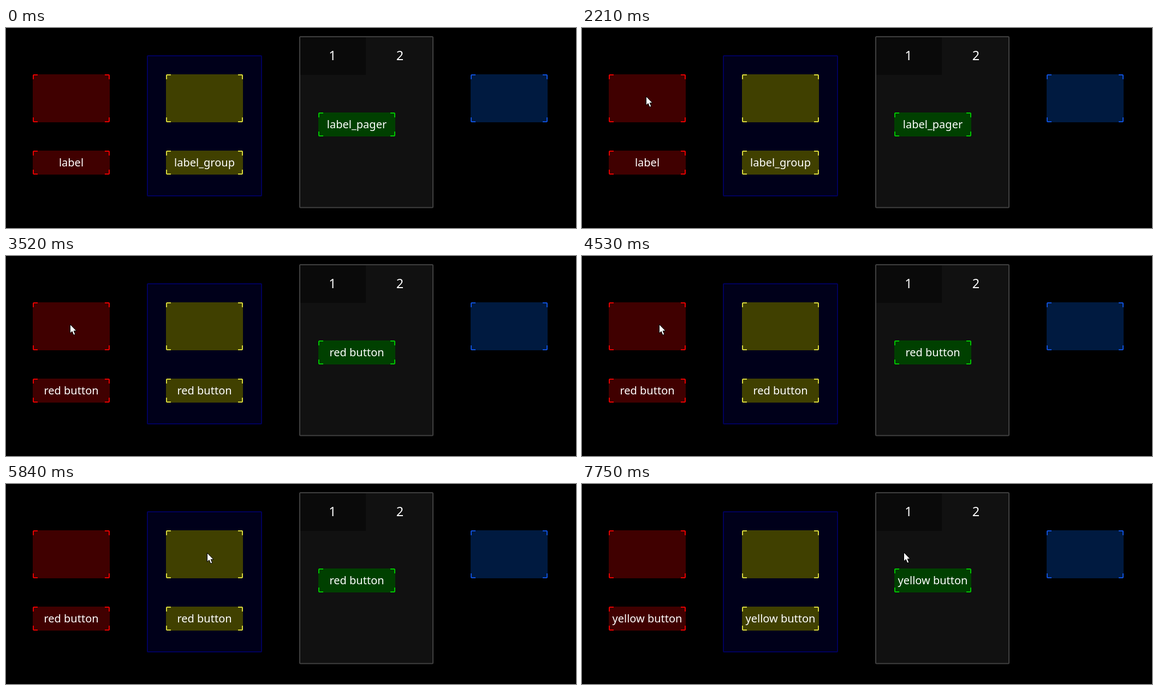
Recreate the animation shown at these times as an HTML page. Size 1044 by 367 pixels, loop 8000 ms.

```html
<!DOCTYPE html>
<html lang="en">
<head>
<meta charset="utf-8">
<title>Button labels</title>
<style>
  html, body { margin: 0; width: 100%; height: 100%; overflow: hidden; background: #000; }
  svg { display: block; }
  text { font: 20px "Noto Sans", "Open Sans", sans-serif; fill: #fff; text-anchor: middle; }
  .tab { font-size: 23.5px; }
</style>
</head>
<body>
<svg id="stage" width="1044" height="367" viewBox="0 0 1044 367">
  <rect x="259" y="51" width="209" height="257" rx="1" fill="#00001a" stroke="#00005c" stroke-width="2"/>
  <rect x="538" y="16" width="244" height="313.5" rx="1.5" fill="#111" stroke="#404040" stroke-width="2"/>
  <rect x="539" y="17" width="120" height="69" fill="#0a0a0a"/>
  <text class="tab" x="598" y="59">1</text>
  <text class="tab" x="721.5" y="59">2</text>
  <g id="boxes"></g>
  <rect id="redLit" x="54" y="90" width="131" height="78.5" rx="2" fill="#f00"/>
  <rect id="yellowLit" x="298" y="90" width="131" height="78.5" rx="2" fill="#ff0"/>
  <g id="cursor">
    <path d="M.5.5V16.8L4.2 13.4L6.8 20L9.8 18.8L7.2 12.4H12Z" fill="#fff" stroke="#000"/>
    <circle id="press" r="12" fill="#ff0" fill-opacity=".5"/>
  </g>
</svg>
<script>
const LOOP = 8000;
const $ = id => document.getElementById(id);
const boxes = $("boxes");

function add(tag, attrs) {
  const node = document.createElementNS("http://www.w3.org/2000/svg", tag);
  for (const name in attrs) node.setAttribute(name, attrs[name]);
  return boxes.appendChild(node);
}

// Filled box with bracket marks in its four corners.
function addBox(x, y, h, fill, mark) {
  const w = 141;
  add("rect", { x, y, width: w, height: h, rx: 2, fill });
  const corner = (cx, cy, sx, sy) =>
    `M${cx + 9 * sx} ${cy + sy}H${cx + 2 * sx}L${cx + sx} ${cy + 2 * sy}V${cy + 9 * sy}`;
  const d = corner(x, y, 1, 1) + corner(x + w, y, -1, 1) +
            corner(x, y + h, 1, -1) + corner(x + w, y + h, -1, -1);
  add("path", { d, fill: "none", stroke: mark, "stroke-width": 2 });
}

function addLabel(x, y, fill, mark) {
  addBox(x, y, 44, fill, mark);
  return add("text", { x: x + 70.5, y: y + 29 });
}

const red = ["#400000", "#e60000"], yellow = ["#404000", "#d6d63c"];
addBox(49, 85, 88, ...red);
addBox(293, 85, 88, ...yellow);
addBox(851, 85, 88, "#001a40", "#0f50d8");
const labels = [
  [addLabel(49, 225, ...red), "label"],
  [addLabel(293, 225, ...yellow), "label_group"],
  [addLabel(572, 155, "#004000", "#00c400"), "label_pager"]
];

// Pointer moves: first step, last step, step count, end x, end y, ease-out power.
const moves = [
  [780, 1100, 4, 374, 291, 1],
  [1300, 1400, 2, 246, 225, 1],
  [1500, 2010, 6, 116, 124, 2],
  [2210, 2310, 2, 117, 125, 1],
  [4530, 5240, 8, 286, 125, 1.13],
  [5340, 5840, 6, 368, 126, 1.5],
  [6150, 6150, 1, 366, 125, 1],
  [7450, 7750, 4, 589, 125, 1]
];

function pointerAt(t) {
  let x = 926, y = 370;
  for (const [start, end, count, toX, toY, power] of moves) {
    if (t < start) break;
    const step = Math.floor((t - start) / (end - start || 1) * (count - 1) + 0.05);
    const p = 1 - (1 - Math.min(1, (step + 1) / count)) ** power;
    x += (toX - x) * p;
    y += (toY - y) * p;
  }
  return [Math.round(x), Math.round(y)];
}

const during = (t, from, to) => t >= from && t < to;
const show = (id, on) => $(id).setAttribute("visibility", on ? "visible" : "hidden");

function draw(now) {
  const t = now % LOOP;
  const message = t >= 6640 ? "yellow button" : t >= 3420 ? "red button" : "";
  for (const [node, idle] of labels) node.textContent = message || idle;
  show("redLit", during(t, 3420, 3520));
  show("yellowLit", during(t, 6640, 6840));
  show("press", during(t, 3320, 3520) || during(t, 6640, 6840));
  $("cursor").setAttribute("transform", `translate(${pointerAt(t)})`);
}

const began = performance.now();
function tick() {
  draw(performance.now() - began);
  requestAnimationFrame(tick);
}
tick();
</script>
</body>
</html>
```
